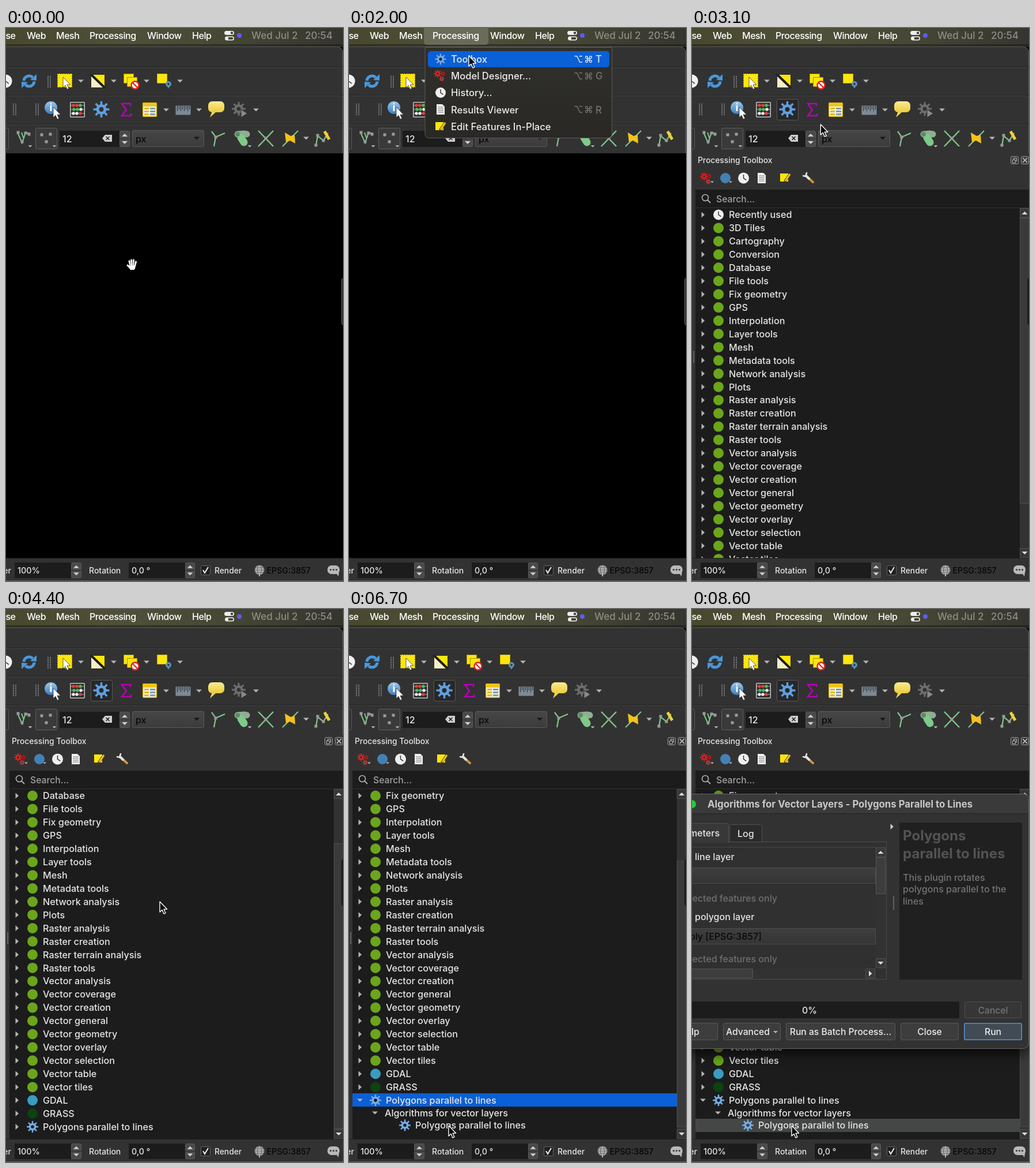
An HTML page with a canvas that plays this animation: 585 by 958 pixels, repeating every 8700 ms.

```html
<!DOCTYPE html>
<html lang="en">
<head>
<meta charset="utf-8">
<title>Processing toolbox</title>
<style>
html, body { margin: 0; width: 100%; height: 100%; overflow: hidden; background: #000; }
canvas { display: block; width: 585px; height: 958px; }
</style>
</head>
<body>
<canvas id="stage"></canvas>
<script>
const W = 585, H = 958, LOOP = 8700, STEP = 100;
const canvas = document.getElementById('stage');
const c = canvas.getContext('2d');
const dpr = window.devicePixelRatio || 1;
canvas.width = W * dpr;
canvas.height = H * dpr;

const BG = '#323232', FIELD = '#1c1c1c', INK = '#e6e6e6', YELLOW = '#fde60a';
const GREEN = '#7fc98a', BLUE = '#74ade6', ACCENT = '#0a60d6', GREY = '#b4b4b4';

// Drawing helpers
function rect(x, y, w, h, fill) { c.fillStyle = fill; c.fillRect(x, y, w, h); }
function paint(fill, stroke, lw = 1) {
  if (fill) { c.fillStyle = fill; c.fill(); }
  if (stroke) { c.strokeStyle = stroke; c.lineWidth = lw; c.stroke(); }
}
function box(x, y, w, h, r, fill, stroke, lw = 1) {
  const d = stroke ? lw / 2 : 0;
  c.beginPath();
  c.roundRect(x + d, y + d, w - 2 * d, h - 2 * d, r);
  paint(fill, stroke, lw);
}
function disc(x, y, r, fill, stroke, lw) {
  c.beginPath(); c.arc(x, y, r, 0, 7); paint(fill, stroke, lw);
}
function trace(pts, x, y) {
  c.beginPath();
  for (let i = 0; i < pts.length; i += 2) c.lineTo(x + pts[i], y + pts[i + 1]);
}
function poly(x, y, pts, fill, stroke, lw) { trace(pts, x, y); c.closePath(); paint(fill, stroke, lw); }
function line(x, y, pts, stroke, lw = 1) { trace(pts, x, y); paint(null, stroke, lw); }
function text(s, x, y, size, color = INK, { weight = 500, align = 'left', gap = 0 } = {}) {
  c.font = `${weight} ${size}px Inter, "DejaVu Sans", sans-serif`;
  c.letterSpacing = gap + 'px';
  c.textAlign = align;
  c.fillStyle = color;
  c.fillText(s, x, y + size * 0.36);
}
function vGrad(y0, y1, a, b) {
  const g = c.createLinearGradient(0, y0, 0, y1);
  g.addColorStop(0, a); g.addColorStop(1, b);
  return g;
}
function clip(x, y, w, h, draw) {
  c.save(); c.beginPath(); c.rect(x, y, w, h); c.clip(); draw(); c.restore();
}

// Small parts
const down = (x, y, s = 5, color = GREY) => poly(x, y, [-s, -s / 2, s, -s / 2, 0, s / 2], color);
const up = (x, y, s = 5, color = GREY) => poly(x, y, [-s, s / 2, s, s / 2, 0, -s / 2], color);
const right = (x, y, color = GREY) => poly(x, y, [-2.5, -5, 3, 0, -2.5, 5], color);
function grip(x, y, n, cols = 2) {
  for (let i = 0; i < n; i++)
    for (let k = 0; k < cols; k++) rect(x + k * 4, y + i * 3, 2, 2, '#777');
}
function gear(x, y, r, color, hole = BG) {
  c.lineCap = 'butt';
  for (let i = 0; i < 8; i++) {
    const a = i * Math.PI / 4, u = Math.cos(a) * r, v = Math.sin(a) * r;
    line(x, y, [u * .5, v * .5, u, v], color, r * .25);
  }
  disc(x, y, r * .64, color);
  disc(x, y, r * .28, hole);
}
function clock(x, y, r) {
  disc(x, y, r, '#f0f0f0');
  line(x, y, [0, -r * .65, 0, 0, r * .5, r * .35], '#333', 1.5);
}
function sheet(x, y) {
  poly(x, y, [-7, -9, 3, -9, 7, -5, 7, 9, -7, 9], '#f2f2f2');
  for (let i = -4; i <= 6; i += 3) line(x, y, [-5, i, 5, i], '#777', 1);
}
function note(x, y) {
  rect(x - 9, y - 8, 14, 14, YELLOW);
  line(x, y, [8, -7, -1, 6], '#5b4a12', 4.5);
  line(x, y, [8, -7, 0, 5], '#f2c52a', 3);
}
function redGears(x, y) {
  gear(x - 4, y - 3, 7, '#e02020');
  gear(x + 5, y - 3, 4.5, '#b51818');
  gear(x + 3, y + 6, 4.5, '#c93a3a');
}
const ARROW = [0, 0, 0, 18, 4, 14.3, 7, 21, 10, 19.7, 7, 13.2, 12.5, 13];
function pointer(x, y, fill = '#000', edge = '#fff', s = 1, lw = 1.4) {
  c.lineJoin = 'round';
  poly(x, y, ARROW.map(v => v * s), fill, edge, lw);
  c.lineJoin = 'miter';
}
const iconPointer = (x, y) => pointer(x, y, '#fff', '#333', 1, .8);
function hand(x, y) {
  c.lineCap = 'round';
  [[-5, -6, -3, 2], [-1.5, -8, -.5, 1], [2.5, -8, 2, 1], [6.5, -5, 4.5, 3], [-8, 1, -3, 6]]
    .forEach(f => line(x, y, f, '#fff', 3));
  poly(x, y, [-4, 0, 6, 0, 5, 7, 3, 9, -3, 9, -6, 5], '#fff');
  [-2.5, 1, 4].forEach(i => line(x, y, [i, -5, i, 1], '#333', .7));
  c.lineCap = 'butt';
}
function spin(x, y, w, h) {
  box(x, y, w, h, 2, '#4a4a4a', '#595959');
  line(x, y + h / 2, [0, 0, w, 0], '#2a2a2a');
  up(x + w / 2, y + h * .27, 5, '#d0d0d0');
  down(x + w / 2, y + h * .73, 5, '#d0d0d0');
}
function arrowButton(x, y, kind) {
  box(x, y, 17, 17, 0, '#383838', '#505050');
  kind(x + 8.5, y + 8.5, kind === right ? '#ddd' : 5, '#ddd');
}

function menuBar(open) {
  const g = c.createLinearGradient(0, 0, W, 0);
  g.addColorStop(0, '#48482f'); g.addColorStop(.35, '#50503a');
  g.addColorStop(.65, '#464735'); g.addColorStop(1, '#35352f');
  rect(0, 0, W, 33, g);
  rect(0, 28, W, 4, 'rgba(20,20,18,.45)');
  if (open) box(130, -4, 112, 33, 5, '#6b6b59');
  const tight = { gap: -.45 };
  text('Database', 16.5, 13, 16, '#fff', { ...tight, align: 'right' });
  [['Web', 36], ['Mesh', 87], ['Processing', 145], ['Window', 245], ['Help', 323]]
    .forEach(([s, x]) => text(s, x, 13, 16, '#fff', tight));
  box(379, 5, 17, 7, 3.5, '#eee');
  disc(392, 8.5, 2.2, '#444');
  box(380, 14.5, 16, 7, 3.5, null, '#eee', 1.6);
  disc(383.5, 18, 2.6, '#eee');
  disc(405, 13, 4, '#5c5cf0');
  text('Wed Jul 2', 426, 12.5, 17, '#8d8d87');
  text('20:54', 567, 12.5, 17, '#8d8d87', { align: 'right' });
}

function toolRowOne() {
  clock(-1, 92, 11.5);
  c.lineCap = 'butt';
  [0, Math.PI].forEach(a => {
    c.save(); c.translate(40, 92); c.rotate(a);
    c.beginPath(); c.arc(0, 0, 9, Math.PI * 1.02, Math.PI * 1.75); paint(null, '#4a97d8', 5);
    poly(0, 0, [13, -12, 13, -1, 2, -2], '#4a97d8');
    c.restore();
  });
  grip(72, 83, 7);
  box(89, 79, 26, 24, 0, YELLOW);
  c.setLineDash([2, 2]);
  box(89, 79, 26, 24, 0, null, '#5a5220');
  c.setLineDash([]);
  iconPointer(99, 85);
  rect(147, 80, 25, 24, YELLOW);
  poly(147, 80, [0, 0, 25, 24, 0, 24], '#f5efc8');
  line(147, 80, [0, 0, 25, 24], '#1c1c1c', 4);
  box(147, 80, 25, 24, 0, null, '#2a2a20');
  box(204, 79, 18, 17, 0, YELLOW, '#a28d10');
  box(210, 85, 18, 17, 0, YELLOW, '#a28d10');
  disc(224, 99, 6.5, '#fff', '#e02424', 2.4);
  line(224, 99, [-4, -4, 4, 4], '#e02424', 2.4);
  box(262, 79, 18, 17, 0, YELLOW, '#c7ae10');
  poly(282, 97, [-5, -1, 5, -1, 0, 8], '#5b8fb5');
  disc(282, 97, 5, '#5b8fb5');
  disc(282, 97, 1.8, '#26323a');
  [130, 187, 244, 302].forEach(x => down(x, 92));
}

function toolRowTwo(pressed) {
  grip(12, 131, 7); grip(51, 131, 7);
  disc(78, 138, 11, vGrad(127, 149, '#9cc8ee', '#3d7dbd'));
  text('i', 78, 138, 18, '#fff', { weight: 700, align: 'center' });
  iconPointer(82, 137);
  box(111, 128, 26, 27, 1, '#2c2c2c', '#c4c4c4', 1.5);
  [134, 141, 148].forEach((y, r) => {
    line(112, y, [0, 0, 24, 0], '#aaa', 1);
    for (let i = 0; i < 3; i++)
      disc(117 + i * 6 + (r === 1 ? 1 : 0), y, 2.7, ['#e53b3b', '#4dbb5a', '#e9e9e9'][(r + (i > 1)) % 3]);
  });
  if (pressed) box(147, 123, 38, 37, 3, '#272727', '#5a5a5a');
  gear(165.5, 141, 14, '#5f9fdf', pressed ? '#272727' : BG);
  line(208, 142, [8, -7, 8, -11, -7, -11, 1, 0, -7, 10, 9, 10, 9, 6], '#b800b8', 2.6);
  box(237, 129, 25, 25, 1, '#f4f4e4', '#e0b800', 1.5);
  rect(238, 130, 23, 6, '#f0c418');
  for (let y = 138; y < 152; y += 5) {
    rect(240, y, 8, 3, '#e2b820'); rect(250, y, 9, 3, '#7f9db5');
  }
  box(294, 134, 27, 17, 1, '#7d8a95', '#566069');
  for (let x = 297; x < 320; x += 3) line(x + .5, 135, [0, 0, 0, x % 2 ? 9 : 6], '#262b30', 1);
  poly(358, 144, [0, 0, 8, 0, -4, 11], '#f1d75f');
  box(351, 127, 28, 19, 7, vGrad(127, 146, '#fbeb91', '#eccb3b'));
  gear(404, 140, 12, '#6d6d6d');
  poly(408, 141, [0, 0, 11, 7, 0, 14], '#8a8a8a', BG);
  [278, 335, 434].forEach(x => down(x, 142));
}

function node(x, y) { rect(x - 2.5, y - 2.5, 5, 5, '#9a9a9a'); }
function toolRowThree() {
  box(-20, 173, 25, 37, 2, null, '#5a5a5a');
  line(20, 181, [0, 0, 8, 18, 14, 0, 22, 2], GREEN, 2);
  line(20, 181, [7, 0, 10, 9], GREEN, 2);
  [[21, 181], [28, 197], [34, 182], [40, 184]].forEach(p => node(...p));
  down(42, 205, 3.5);
  box(51, 173, 38, 37, 2, '#3a3a3a', '#5f5f5f');
  [[62, 185], [77, 184], [70, 197]].forEach(p => node(...p));
  down(84, 205, 3.5);
  rect(93, 178, 104, 28, FIELD);
  text('12', 98, 192, 16);
  poly(167, 191, [0, 0, 5, -6, 17, -6, 17, 6, 5, 6], '#cfcfcf');
  line(176.5, 191, [-3, -3, 3, 3], '#222', 1.6);
  line(176.5, 191, [-3, 3, 3, -3], '#222', 1.6);
  spin(197, 178, 18, 28);
  box(219, 177, 125, 29, 2, vGrad(177, 206, '#474747', '#3b3b3b'), '#5b5b5b');
  text('px', 225, 192, 16, '#080808');
  down(331, 191, 5, '#161616');
  line(367, 190, [-10, -11, -3, -1, 13, -8], GREEN, 2.2);
  line(367, 190, [-3, -1, -6, 15], GREEN, 2.2);
  node(364, 189);
  c.lineCap = 'round';
  line(410, 190, [-8, -6, 3, -7, 8, -6], '#8fae92', 11);
  line(410, 190, [-2, 0, 3, 8], GREEN, 13);
  c.lineCap = 'butt';
  disc(402, 184, 4, '#5d8a63');
  down(423, 205, 3.5);
  line(451, 191, [-13, -13, 13, 14], GREEN, 2.4);
  line(451, 191, [13, -13, -13, 14], GREEN, 2.4);
  node(451, 191);
  line(493, 191, [-13, 14, 14, -13], GREEN, 2.2);
  poly(493, 191, [-9, -10, 1, -4, 8, -6, 9, 9, 0, 4, -7, 7], '#f3c21c');
  down(521, 191);
  line(549, 191, [-11, 13, -8, -4, 2, 4, 10, -9], GREEN, 2.2);
  line(549, 191, [4, -12, 12, 2], '#f0cf3a', 5);
  [[538, 203], [541, 186], [551, 195]].forEach(p => node(...p));
}

function statusBar() {
  rect(0, 918, W, 40, BG);
  rect(0, 918, W, 1, '#1f1f1f');
  rect(0, 957, W, 1, '#5a5a5a');
  text('Magnifier', 9, 940, 14, INK, { align: 'right' });
  rect(15, 926, 98, 27, FIELD);
  text('100%', 20, 940, 14.4);
  spin(113, 926, 18, 27);
  text('Rotation', 144, 940, 14);
  rect(213, 926, 98, 27, FIELD);
  text('0,0 °', 218, 940, 14.2);
  spin(311, 926, 17, 27);
  box(338, 931, 17, 17, 2, '#1f1f1f', '#666');
  line(346, 940, [-4, -1, -1, 4, 5, -6], '#f0f0f0', 2);
  text('Render', 362, 940, 13.8);
  disc(440, 939, 8.5, '#b5b5b5');
  [3.5, 8].forEach(r => { c.beginPath(); c.ellipse(440, 939, r, 8.5, 0, 0, 7); paint(null, '#555', .8); });
  [-4, 0, 4].forEach(d => line(432, 939 + d, [0, 0, 16, 0], '#555', .8));
  rect(439, 945, 2, 5, '#b5b5b5');
  text('EPSG:3857', 452.5, 940, 14.2, '#060606');
  box(558, 931, 21, 15, 7, '#b9b9b9');
  poly(572, 943, [0, 0, 6, 0, 5, 7], '#b9b9b9');
  [563.5, 568.5, 573.5].forEach(x => disc(x, 938.5, 1.6, '#3a3a3a'));
}

function mainWindow(pressed) {
  c.beginPath(); c.roundRect(-20, 32, W + 20, 400, [0, 10, 0, 0]);
  paint(BG);
  c.beginPath(); c.roundRect(-20, 32.5, W + 19.5, 400, [0, 10, 0, 0]);
  paint(null, '#5c5c5c', 1);
  [68, 117, 167].forEach(y => { rect(0, y - 1, W, 1, '#222'); rect(0, y, W, 1, '#454545'); });
  toolRowOne();
  toolRowTwo(pressed);
  toolRowThree();
  rect(0, 217, W, 701, '#000');
}

function processingMenu(hover, alpha) {
  c.save();
  c.globalAlpha = alpha;
  box(131.5, 33, 325.5, 158, [0, 0, 7, 7], vGrad(33, 190, '#30302c', '#292824'), '#5a5a56');
  if (hover) box(137, 40, 315, 28, 5, ACCENT);
  gear(159, 54, 9.5, BLUE, '#2e2e2a');
  redGears(158, 82);
  clock(159, 112, 9);
  sheet(159, 141);
  note(159, 171);
  ['Toolbox', 'Model Designer...', 'History...', 'Results Viewer', 'Edit Features In-Place'].forEach((s, i) => {
    const y = 54 + i * 29.2, key = ['T', 'G', '', 'R'][i];
    text(s, 177, y, 16.6, '#ececec');
    if (!key) return;
    const ink = hover && !i ? '#dde8fa' : '#74746f';
    text('⌥', 390, y, 16, ink); text('⌘', 408, y, 16, ink); text(key, 428, y, 16.6, ink);
  });
  c.restore();
}

const groups = ['Recently used', '3D Tiles', 'Cartography', 'Conversion', 'Database', 'File tools', 'Fix geometry',
  'GPS', 'Interpolation', 'Layer tools', 'Mesh', 'Metadata tools', 'Network analysis', 'Plots', 'Raster analysis',
  'Raster creation', 'Raster terrain analysis', 'Raster tools', 'Vector analysis', 'Vector coverage',
  'Vector creation', 'Vector general', 'Vector geometry', 'Vector overlay', 'Vector selection', 'Vector table',
  'Vector tiles', 'GDAL', 'GRASS', 'Polygons parallel to lines'];
const LAST = groups.length - 1, ROW = 22.94, LIST_Y = 312;

function groupIcon(i, y) {
  if (i === 0) clock(46, y, 9);
  else if (i === LAST) gear(46, y, 10, BLUE, FIELD);
  else disc(46, y, 9, groups[i] === 'GDAL' ? '#3a9cc0' : groups[i] === 'GRASS' ? '#0d4212' : '#6ba51c');
}

function tree(s) {
  rect(6, LIST_Y, 563, 606, FIELD);
  clip(6, LIST_Y, 563, 606, () => {
    groups.forEach((name, i) => {
      const y = LIST_Y + 11.5 + (i - s.scroll) * ROW;
      if (y < LIST_Y - ROW || y > 940) return;
      const last = i === LAST;
      if (last && s.selected === 'group') rect(6, Math.round(y - 12), 563, 23, ACCENT);
      if (last && s.expanded) down(19, y, 5); else right(19, y);
      groupIcon(i, y);
      text(name, 64, y, 16.15);
      if (!last || !s.expanded) return;
      down(45, y + 22, 5);
      text('Algorithms for vector layers', 62, y + 21.6, 16.15);
      const fill = s.selected !== 'child' ? FIELD : s.dialog ? '#454646' : ACCENT;
      rect(6, Math.round(y + 31.7), 563, 23, fill);
      gear(97, y + 43.2, 10, BLUE, fill);
      text('Polygons parallel to lines', 115, y + 43.2, 16.15);
    });
  });
  rect(569, LIST_Y, 16, 606, BG);
  const len = s.expanded ? 461 : 495;
  const top = 329 + s.scroll * (s.expanded ? 17.9 : 19.25);
  box(569, top, 17, len, 0, '#3a3a3a', '#505050');
  arrowButton(569, 312, up);
  arrowButton(569, 901, down);
}

function panel(s) {
  rect(0, 217, W, 701, BG);
  text('Processing Toolbox', 10, 229, 13.8);
  [553, 571].forEach(x => box(x, 222, 14, 14, 2, '#3a3a3a', '#9a9a9a'));
  box(558, 225, 6, 6, 0, null, '#bbb'); box(556, 228, 6, 6, 0, BG, '#bbb');
  line(578, 229, [-4, -4, 4, 4], '#ccc', 1.4); line(578, 229, [-4, 4, 4, -4], '#ccc', 1.4);
  redGears(25, 260); down(35, 267, 3);
  disc(58, 260, 9, '#4381b5'); down(67, 267, 3);
  clock(89.5, 260, 9.5);
  sheet(121, 260);
  note(162, 260);
  c.lineCap = 'round';
  line(202, 260, [-4, -4, 8, 7], '#c9963c', 4);
  line(202, 260, [-4, -4, 1, 1], '#e4e4e4', 4);
  line(202, 260, [-9, -4, -5, -3, -3, -9], '#e4e4e4', 2.6);
  c.lineCap = 'butt';
  rect(6, 280, 579, 31, FIELD);
  disc(23, 294, 5.5, null, '#b0b0b0', 1.6);
  line(27, 298, [0, 0, 5, 5], '#b0b0b0', 1.8);
  text('Search...', 42, 296, 15.7, '#a2a2a2');
  tree(s);
  grip(2, 560, 7, 1);
}

function button(label, x, w, { y = 717, h = 30, cx = x + w / 2, fill = '#3d3d3d', edge = '#585858', ink = '#ececec', lw = 1 } = {}) {
  box(x, y, w, h, 2, fill, edge, lw);
  text(label, cx, y + h / 2 + .5, 15.7, ink, { align: 'center' });
}

function dialog() {
  c.save();
  c.shadowColor = 'rgba(0,0,0,.7)'; c.shadowBlur = 22; c.shadowOffsetY = 8;
  box(-30, 320, 615, 442, 10, BG);
  c.restore();
  box(-30, 320, 615, 442, 10, BG, '#656565');
  box(-29, 321, 613, 33, [10, 10, 0, 0], '#3a3a3a');
  rect(0, 354, 584, 1, '#232323');
  disc(0, 338, 7, '#2ac840');
  text('Algorithms for Vector Layers - Polygons Parallel to Lines', 27, 337.5, 16.8, '#c8c8c8', { weight: 700 });

  box(-10, 403, 348, 239, 0, '#303030', '#4c4c4c');
  box(65, 373, 57, 31, [3, 3, 0, 0], '#2b2b2b', '#505050');
  box(-10, 371, 74, 34, [3, 3, 0, 0], '#383838', '#505050');
  rect(0, 403, 63, 3, '#363636');
  text('Parameters', 48, 388.5, 16, INK, { align: 'right' });
  text('Log', 79, 389, 16);
  rect(0, 412, 319, 1, '#484848');
  text('line layer', 5, 429, 16);
  text('polygon layer', 5, 533.5, 16);
  [448, 553].forEach(y => box(-10, y, 329, 28, 0, vGrad(y, y + 28, '#3e3e3e', '#353535'), '#4d4d4d'));
  text('poly [EPSG:3857]', 121, 567, 16, '#080808', { align: 'right' });
  [501.5, 606].forEach(y => text('Selected features only', 148, y, 16, '#6f6f6f', { align: 'right' }));
  rect(319, 413, 17, 210, BG);
  arrowButton(319, 413, up);
  box(319, 430, 17, 64, 0, '#3d3d3d', '#555');
  arrowButton(319, 605, down);
  rect(0, 623, 319, 17, BG);
  box(-10, 623, 116, 17, 0, '#3d3d3d', '#555');
  arrowButton(301, 623, right);

  right(347, 377, '#c8c8c8');
  grip(349, 498, 8, 1);
  rect(360, 370, 213, 272, '#202020');
  text('Polygons', 366, 392, 24.1, '#535353', { weight: 700 });
  text('parallel to lines', 366, 423.5, 24.1, '#535353', { weight: 700 });
  ['This plugin rotates', 'polygons parallel to the', 'lines']
    .forEach((s, i) => text(s, 366, 465 + i * 20.4, 16.1, '#747474'));

  box(-10, 680, 474, 29, 2, FIELD);
  text('0%', 191, 695, 15.8);
  button('Cancel', 473, 99, { y: 680, h: 29, fill: '#363636', edge: '#505050', ink: '#747474' });
  button('Help', -55, 100, { cx: -4.5 });
  button('Advanced', 54, 100, { cx: 97 });
  down(145, 733, 4);
  button('Run as Batch Process...', 163, 190);
  button('Close', 362, 101);
  button('Run', 472, 101, { fill: '#414b56', edge: '#5590cc', lw: 1.6 });
}

function edgeTab(panelShown) {
  box(582, 432, 12, 84, 5, panelShown ? '#1c1c1c' : '#2e2e2e', panelShown ? '#222' : '#5a5a5a');
}

// Pointer stops: time, x, y
const stops = [[0, 219, 410], [800, 198, 8], [1250, 198, 8], [1900, 208, 48], [2700, 208, 48],
  [3900, 267, 507], [4800, 267, 507], [5500, 173, 895], [LOOP, 173, 895]];
function pointerAt(t) {
  const i = stops.findIndex(s => s[0] > t), [t0, x0, y0] = stops[i - 1], [t1, x1, y1] = stops[i];
  const p = (t - t0) / (t1 - t0), e = p * p * (3 - 2 * p);
  return [x0 + (x1 - x0) * e, y0 + (y1 - y0) * e];
}

function draw(t) {
  const shown = t >= 2700;
  const s = {
    scroll: Math.max(0, Math.min(4, Math.floor((t - 4100) / 100) * 2))
      + Math.max(0, Math.min(2, Math.floor((t - 6300) / 100))),
    selected: t >= 7600 ? 'child' : t >= 5800 ? 'group' : '',
    expanded: t >= 5800,
    dialog: t >= 8000
  };
  const [x, y] = pointerAt(t);
  const menuAlpha = t < 800 ? 0 : Math.max(0, Math.min(1, (2400 - t) / 200));
  menuBar(menuAlpha === 1);
  mainWindow(shown);
  if (shown) panel(s);
  edgeTab(shown);
  statusBar();
  if (menuAlpha) processingMenu(y > 36, menuAlpha);
  if (s.dialog) dialog();
  if (!shown && y > 217) hand(x, y); else pointer(x, y);
}

function frame() {
  const t = Math.floor((performance.now() % LOOP) / STEP) * STEP;
  c.setTransform(dpr, 0, 0, dpr, 0, 0);
  c.clearRect(0, 0, W, H);
  draw(t);
  requestAnimationFrame(frame);
}
frame();
</script>
</body>
</html>
```
